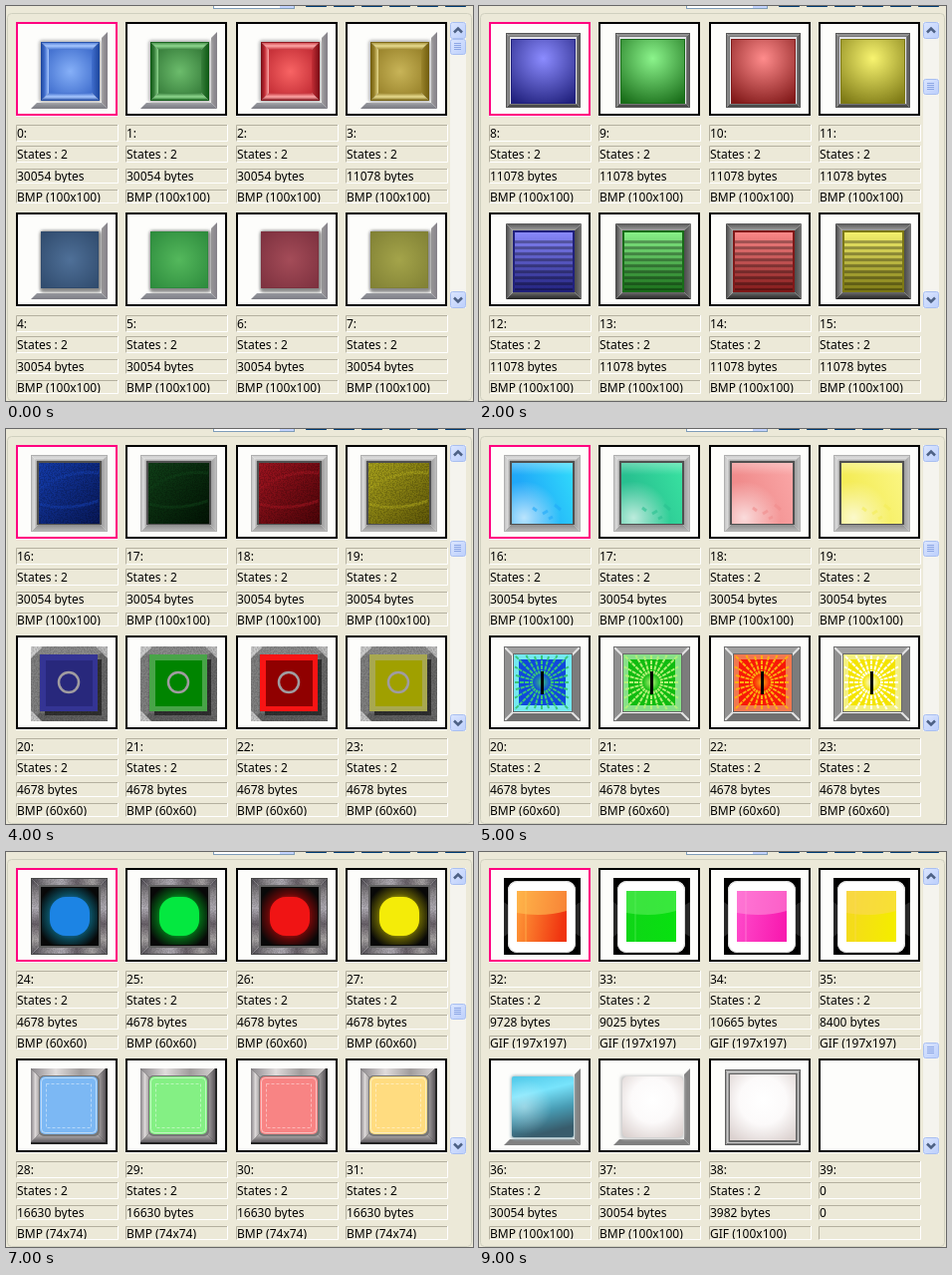
An HTML page for the animation above (10 s loop, 469x396 px).

```html
<!DOCTYPE html>
<html lang="en">
<head>
<meta charset="utf-8">
<title>Button gallery</title>
<style>
  html, body { margin: 0; width: 100%; height: 100%; overflow: hidden; background: #ece9d8; }
  #stage { display: block; width: 469px; height: 396px; }
  text { font: 12px "Noto Sans", "Open Sans", sans-serif; fill: #000; white-space: pre; }
  .page { visibility: hidden; animation: show 10s step-end infinite; animation-delay: calc(var(--i) * 1s - 10s); }
  @keyframes show {
    0% { visibility: visible; }
    10%, 100% { visibility: hidden; }
  }
</style>
</head>
<body>
<svg id="stage" viewBox="0 0 469 396"></svg>
<script>
const COLS = [10, 120, 231, 341], ROWS = [0, 191];
const defs = new Map();

// Paint helpers: each distinct gradient is defined once.
function define(key, make) {
  if (!defs.has(key)) defs.set(key, make('p' + defs.size));
  return `url(#${/id="(\w+)"/.exec(defs.get(key))[1]})`;
}
const stops = list => list.map((c, i) =>
  `<stop offset="${i / (list.length - 1)}" stop-color="${c}"/>`).join('');
const lin = (x, y, ...list) => define(['lin', x, y, list].join(), id =>
  `<linearGradient id="${id}" x1="0" y1="0" x2="${x}" y2="${y}">${stops(list)}</linearGradient>`);
const rad = (cx, cy, r, ...list) => define(['rad', cx, cy, r, list].join(), id =>
  `<radialGradient id="${id}" cx="${cx}" cy="${cy}" r="${r}">${stops(list)}</radialGradient>`);

const rect = (x, y, w, h, fill, more = '') =>
  `<rect x="${x}" y="${y}" width="${w}" height="${h}" fill="${fill}" ${more}/>`;
const poly = (points, fill) => `<polygon points="${points}" fill="${fill}"/>`;
const path = (d, stroke, width = 1, more = '') =>
  `<path d="${d}" fill="none" stroke="${stroke}" stroke-width="${width}" ${more}/>`;
const outline = (x, y, w, h, color, width = 1, more = '') =>
  rect(x + width / 2, y + width / 2, w - width, h - width, 'none', `stroke="${color}" stroke-width="${width}" ${more}`);
const soft = (x, y, w, h, color) => rect(x, y, w, h, color, 'rx="4" filter="url(#blur)"');
const grain = (x, y, w, h, alpha) => rect(x, y, w, h, '#000', `filter="url(#grain)" opacity="${alpha}"`);

function bevel(x, y, w, h, t, [top, right, bottom, left]) {
  const X = x + w, Y = y + h;
  return poly([x, y, X, y, X - t, y + t, x + t, y + t], top) +
    poly([X, y, X, Y, X - t, Y - t, X - t, y + t], right) +
    poly([x, Y, X, Y, X - t, Y - t, x + t, Y - t], bottom) +
    poly([x, y, x, Y, x + t, Y - t, x + t, y + t], left);
}
const stand = on =>
  poly([92, 10, 92, 87, 86, 81, 86, 16], on ? '#848484' : lin(1, 0, '#9c9a9c', '#848088')) +
  poly([15, 87, 92, 87, 86, 81, 21, 81], on ? '#808080' : lin(0, 1, '#989aa0', '#7c7c84'));

// Button styles, drawn in thumbnail coordinates: (column, lit).
const BEVEL_OFF = [
  ['#a8c8ff', '#416fce', '#1c459c', '#86b0f8'], ['#90d890', '#387f3c', '#0c5812', '#6cbc6c'],
  ['#ffa8a8', '#c42e36', '#780c14', '#f86464'], ['#e8dc90', '#9a842c', '#705c0c', '#c8b458']];
const BEVEL_ON = [
  ['#80e8fc', '#40b4d8', '#2c88b4', '#50dcfc'], ['#d4e8a4', '#a8cc7c', '#8cb45c', '#c6de9e'],
  ['#ff7474', '#dc2c34', '#b41820', '#ff4a4a'], ['#f6f0a0', '#dcd468', '#c8b84c', '#ece48c']];
function beveledKey(c, on) {
  const [light, mid, dark, face] = (on ? BEVEL_ON : BEVEL_OFF)[c];
  const [x, y, s] = on ? [23, 19, 61] : [25, 20, 59];
  return stand(on) + soft(x - 2, y - 2, s + 4, s + 4, on ? light : '#bbb') +
    bevel(x, y, s, s, 8, [lin(0, 1, mid, light, mid), lin(1, 0, mid, dark), lin(0, 1, mid, light, dark), lin(1, 0, dark, mid, light)]) +
    rect(x + 8, y + 8, s - 16, s - 16, rad(.5, .5, .7, face, on ? face : mid)) +
    outline(x, y, s, s, dark, 1, 'opacity=".7"');
}

const FLAT = [['#4f7098', '#2f4a6c'], ['#54b85c', '#2c8a3c'], ['#a44c58', '#7c303e'], ['#a4a44a', '#808034']];
const GLOW = [['#2c5cff', '#7ca8ff'], ['#20e428', '#70f870'], ['#ff2c2c', '#ff7878'], ['#f4ec28', '#f8f464']];
function flatKey(c, on) {
  const [edge, body] = GLOW[c], [center, rim] = FLAT[c];
  return stand(on) + (on
    ? soft(22, 14, 64, 65, body) + rect(25, 18, 58, 59, rad(.55, .15, .85, '#fff', '#fff', '#fff', body, body)) +
      outline(25, 17, 59, 60, edge, 1.5)
    : soft(24, 18, 62, 62, '#888') + rect(25, 19, 58, 57, rad(.5, .5, .7, center, rim)) + outline(25, 19, 58, 57, rim));
}

const VIVID = ['#2828f8', '#20e020', '#f82020', '#f4ec10'];
const TINT = ['#8c8cff', '#8cf48c', '#ff8c8c', '#f8f470'];
const DEEP = ['#20207c', '#186c18', '#801818', '#7c7814'];
function domeKey(c, on) {
  const face = on ? rad(.5, .28, .72, '#fff', '#fff', '#fff', TINT[c], '#fff')
    : rad(.5, .3, .8, TINT[c], DEEP[c]);
  return bevel(17, 11, 75, 75, 4, ['#909090', '#606060', '#4c4c4c', '#858585']) +
    outline(17, 11, 75, 75, '#555') + rect(20, 14, 69, 69, '#e4e4e8') + outline(20, 14, 69, 69, '#777') +
    rect(22, 17, 65, 65, face) + outline(22, 17, 65, 65, on ? VIVID[c] : DEEP[c]);
}
function stripedKey(c, on) {
  let lines = '';
  for (let y = 28; y < 78; y += 6) lines += rect(26, y, 58, 3, on ? '#fff' : '#000', `opacity="${on ? .65 : .3}"`);
  return bevel(17, 11, 76, 76, 8, [lin(0, 1, '#555', '#aaa'), lin(1, 0, '#444', '#777'), lin(0, 1, '#777', '#222'), lin(1, 0, '#444', '#aaa')]) +
    rect(24, 18, 62, 62, on ? lin(0, 1, '#fff', TINT[c], VIVID[c]) : lin(0, 1, TINT[c], DEEP[c])) + lines +
    rect(26, 20, 58, 58, on ? rad(.5, .25, .5, '#fff', '#ffffff00') : 'none') +
    outline(24, 18, 62, 62, on ? VIVID[c] : DEEP[c], 2);
}

const GLASS_OFF = [['#143cac', '#081858'], ['#104018', '#021404'], ['#a01420', '#4c0408'], ['#aaa41c', '#605808']];
const GLASS_ON = [['#20a8f8', '#34e4fc'], ['#28c090', '#3ce8a4'], ['#f08c8c', '#fcacac'], ['#f4ec58', '#fcf88c']];
function glassKey(c, on) {
  const [a, b] = (on ? GLASS_ON : GLASS_OFF)[c];
  return bevel(15, 10, 77, 77, 7, [lin(0, 1, '#c8c8c8', '#dcdcdc', '#909090'), lin(1, 0, '#989898', '#c4c4c4'),
      lin(0, 1, '#8c8c8c', '#bcbcbc'), lin(1, 0, '#c0c0c0', '#d8d8d8', '#909090')]) +
    outline(15, 10, 77, 77, '#b0b0b0') + rect(21, 16, 65, 64, '#505050') +
    rect(23, 18, 61, 61, lin(1, on ? -.4 : 1, a, b)) +
    (on ? rect(23, 18, 61, 61, rad(.2, .9, .6, '#ffffffb0', '#ffffff00')) + rect(23, 18, 61, 12, lin(0, 1, '#ffffff50', '#ffffff00')) +
        path('M44 63l4 3M54 69l5-3M66 60l6 5M60 74l4-2', a, 3, 'opacity=".6"')
        : path('M24 45Q47 25 83 28M24 59Q51 67 83 56', a, 3, 'opacity=".6"') + grain(23, 18, 61, 61, .2));
}

const RING = [['#343494', '#28287c'], ['#48a448', '#008400'], ['#f81414', '#900000'], ['#a8a850', '#a0a000']];
const SUN = [['#74e8f0', '#1048dc', '#38c878'], ['#88e088', '#10bc10', '#b4f078'],
  ['#f07850', '#f81808', '#fcb010'], ['#f4f080', '#f4e400', '#fffff0']];
function ringKey(c, on) {
  const [edge, body, ray] = on ? SUN[c] : RING[c];
  const plate = bevel(15, 11, 77, 75, 8, on ? ['#a0a0a0', '#7c7c7c', '#707070', '#909090'] : ['#8c8c8c', '#686868', '#606060', '#808080']);
  if (!on) {
    return rect(15, 11, 77, 75, '#707070') + plate + poly([15, 11, 27, 11, 15, 23], '#ccc') +
      poly([92, 11, 80, 11, 92, 23], '#bbb') + poly([15, 86, 15, 75, 26, 86], '#c4c4c4') +
      rect(29, 24, 57, 56, '#303030') + grain(15, 11, 77, 75, .14) +
      rect(24, 19, 58, 57, edge) + rect(30, 25, 47, 46, body) +
      `<circle cx="53" cy="47" r="10" fill="none" stroke="#a09ca0" stroke-width="2.5"/>`;
  }
  let rays = '';
  for (let k = 0; k < 24; k++) {
    const a = k * Math.PI / 12, dx = Math.cos(a), dy = Math.sin(a);
    const reach = 27 / Math.max(Math.abs(dx), Math.abs(dy));
    rays += `M${53 + 8 * dx} ${47 + 8 * dy}L${53 + reach * dx} ${47 + reach * dy}`;
  }
  return plate + path('M15 11l9 9M92 11l-9 9M15 86l9-9M92 86l-9-9', '#e4e4e4', 2) + outline(15, 11, 77, 75, '#707070') +
    rect(24, 18, 60, 59, '#686868') + rect(25, 19, 58, 57, edge) + rect(30, 24, 47, 46, body) +
    path(rays, ray, 2, 'stroke-dasharray="4 1"') + `<circle cx="53" cy="47" r="9" fill="${rad(.5, .5, .5, ray, body)}"/>` +
    rect(52, 36, 3, 23, '#000');
}

const LAMP = [['#1c84e4', '#0a4858'], ['#04e840', '#045c14'], ['#f01414', '#600808'], ['#f4ec08', '#585404']];
function lampKey(c, on) {
  const [body, ring] = LAMP[c];
  const metal = (x, y) => lin(x, y, '#48444c', '#8c888c', '#b0acb4', '#686068', '#a8a4a4', '#504c54');
  return bevel(15, 10, 77, 77, 10, [metal(1, 0), metal(0, 1), metal(1, 0), metal(0, 1)]) +
    grain(15, 10, 77, 77, .12) + outline(15, 10, 77, 77, '#484848') + outline(23, 17, 62, 63, '#606060', 2) +
    rect(25, 19, 58, 59, '#080808') +
    rect(26, 20, 56, 57, on ? rad(.5, .5, .6, body, body, ring, '#080808') : '#101010', 'rx="6"') +
    rect(34, 29, 40, 39, on ? body : ring, 'rx="16"');
}
const PASTEL = ['#7cb8f4', '#84f084', '#f88484', '#ffdc80'];
const MUTED = ['#3c6c9c', '#388c38', '#a03c3c', '#ac8c30'];
function padKey(c, on) {
  return rect(15, 10, 77, 76, '#242424') +
    bevel(15, 10, 75, 74, 9, [lin(1, 0, '#8c888c', '#e0dcdc', '#a09c9c', '#d8d4d4'), lin(1, 0, '#b8b4b4', '#585458'),
      lin(0, 1, '#c4c0c0', '#605c60'), lin(1, 0, '#888488', '#dcd8d8', '#a09c9c')]) +
    rect(23, 17, 61, 61, '#777', 'rx="5"') + rect(24, 18, 58, 58, (on ? PASTEL : MUTED)[c], 'rx="5"') +
    outline(25, 19, 56, 56, '#ffffff80', 1, 'rx="4"') +
    outline(30, 25, 46, 45, '#ffffff70', 1, 'stroke-dasharray="3 2"');
}

const GEL = [['#ff9c38', '#f03410', '#ffc858'], ['#10d418', '#08e010', '#60f060'],
  ['#ff4ccc', '#f81cb0', '#ff98dc'], ['#f4d820', '#f4ec00', '#fcd860']];
const GEL_OFF = [['#a04c18', '#801408', '#b87838'], ['#0c7010', '#086808', '#409840'],
  ['#982878', '#881060', '#b0609c'], ['#948414', '#8c8404', '#a89844']];
function gelKey(c, on) {
  const [left, right, gloss] = (on ? GEL : GEL_OFF)[c];
  return rect(15, 10, 77, 77, '#000') +
    poly([15, 34, 19, 37, 19, 66, 15, 69], '#282828') + poly([92, 34, 87, 37, 87, 66, 92, 69], '#282828') +
    rect(19, 13, 68, 72, '#fff', 'rx="9"') + outline(19, 13, 68, 72, '#d8d8d8', 1, 'rx="9"') +
    rect(28, 23, 50, 51, lin(1, .15, left, right)) +
    `<path d="M28 23H78V43Q54 50 28 45Z" fill="${gloss}" opacity=".55"/>` + path('M37 23v51', gloss, 2, 'opacity=".3"');
}
function assorted(c, on) {
  const pearl = rad(.5, .4, .72, on ? '#fff' : '#d8d4d4', on ? '#fcfafa' : '#c4c0c0', on ? '#dcd2d0' : '#989090');
  if (c === 0) return stand(on) + soft(22, 17, 64, 64, '#9cb8c0') +
    rect(23, 18, 62, 61, on ? lin(.25, 1, '#50c8e8', '#78e4fc', '#489cb4', '#385c6c') : lin(.25, 1, '#28687c', '#387c8c', '#243c48'), 'rx="2"') +
    rect(23, 18, 62, 61, rad(.2, .5, .45, '#ffffff60', '#ffffff00'));
  if (c === 1) return stand(on) + soft(22, 17, 64, 64, '#ccc') + rect(24, 18, 61, 61, pearl, 'rx="5"');
  if (c === 2) return bevel(16, 11, 76, 76, 5, ['#a8a8a8', '#808080', '#707070', '#9c9c9c']) +
    outline(16, 11, 76, 76, '#606060') + outline(18, 13, 72, 72, '#ccc') + rect(21, 16, 66, 66, pearl) + outline(20, 15, 68, 68, '#666');
  return '';
}

// Each row: style, file size per column, format, sizes when lit if they differ.
const same = n => [n, n, n, n];
const PAGES = [
  [[beveledKey, [30054, 30054, 30054, 11078], 'BMP (100x100)'], [flatKey, same(30054), 'BMP (100x100)']],
  [[domeKey, same(11078), 'BMP (100x100)'], [stripedKey, same(11078), 'BMP (100x100)']],
  [[glassKey, same(30054), 'BMP (100x100)'], [ringKey, same(4678), 'BMP (60x60)']],
  [[lampKey, same(4678), 'BMP (60x60)'], [padKey, same(16630), 'BMP (74x74)']],
  [[gelKey, [9104, 8846, 9912, 8075], 'GIF (197x197)', [9728, 9025, 10665, 8400]],
   [assorted, [30054, 30054, 3614, 0], 'BMP (100x100)', [30054, 30054, 3982, 0]]]];

// Label boxes: top, height, text baseline.
const LABELS = [[119, 17, 13], [140, 17, 13], [163, 15, 12], [184, 14, 12]];
const label = (x, y, h, base, words) =>
  `<svg x="${x}" y="${y}" width="102" height="${h - 1}"><text x="1" y="${base}">${words}</text></svg>`;

function cell(page, row, col, on) {
  const [style, sizes, format, litSizes = sizes] = PAGES[page][row];
  const x = COLS[col], y = ROWS[row], number = page * 8 + row * 4 + col;
  const size = (on ? litSizes : sizes)[col];
  const kind = number === 38 ? 'GIF (100x100)' : format;
  const words = size ? [number + ':', 'States : 2', size + ' bytes', kind] : [number + ':', '0', '0', ''];
  return `<g transform="translate(${x} ${y + 16})">${style(col, on)}</g>` +
    LABELS.map(([top, h, base], i) => label(x, y + top, h, base, words[i])).join('');
}

const knob = (y, h) => rect(446, y, 16, h, '#fff', 'rx="2"') +
  rect(446.5, y + .5, 15, h - 1, lin(1, 1, '#dce6fe', '#bccffc'), 'rx="2" stroke="#a9bff0"');
const scrollThumb = page => {
  const y = 33 + Math.round(page * 39.5);
  return knob(y, 16) + path([5, 7, 9, 11].map(d => `M450 ${y + d - .5}h7`).join(''), '#8ca6e4');
};

function backdrop() {
  let out = rect(0, 0, 469, 396, '#ece9d8') +
    outline(1, 7, 467, 389, '#d0d0bf', 1, 'rx="4"') +
    rect(208, 0, 82, 3, '#7f9db9') + rect(209, 0, 80, 2, '#fff') + rect(275, 0, 14, 2, '#c3d3fd');
  for (let x = 301; x < 460; x += 28) out += rect(x, 0, 21, 1, '#003c74', 'rx=".5"');
  out += rect(446, 16, 16, 287, '#f5f4ee') + knob(16, 17) + knob(286, 17) +
    path('M450 26.5l4-4 4 4M450 292.5l4 4 4-4', '#4d6185', 2.5);
  ROWS.forEach((y, r) => COLS.forEach((x, c) => {
    out += rect(x, y + 16, 102, 95, '#fdfdfb') + outline(x, y + 16, 102, 94, r + c ? '#000' : '#ff0080', 2) +
      LABELS.map(([top, h]) => {
        const b = y + top + h - .5;
        return path(`M${x + 102.5} ${y + top}V${b}H${x}`, '#fff') +
          path(`M${x + 102} ${y + top + .5}H${x + .5}V${b}`, '#b4b09f');
      }).join('');
  }));
  return out;
}

let pages = '';
for (let i = 0; i < 10; i++) {
  const page = i >> 1, on = i % 2 === 1;
  pages += `<g class="page" style="--i:${i}">${scrollThumb(page)}` +
    ROWS.map((_, r) => COLS.map((_, c) => cell(page, r, c, on)).join('')).join('') + '</g>';
}
const body = backdrop() + pages;
document.getElementById('stage').innerHTML = `<defs>${[...defs.values()].join('')}
  <filter id="blur" x="-20%" y="-20%" width="140%" height="140%"><feGaussianBlur stdDeviation="1.6"/></filter>
  <filter id="grain" x="0" y="0" width="1" height="1"><feTurbulence type="fractalNoise" baseFrequency=".7" numOctaves="2" seed="4"/>
    <feColorMatrix values="0 0 0 0 0  0 0 0 0 0  0 0 0 0 0  0 0 0 4 -1.6"/></filter></defs>${body}`;
</script>
</body>
</html>
```
